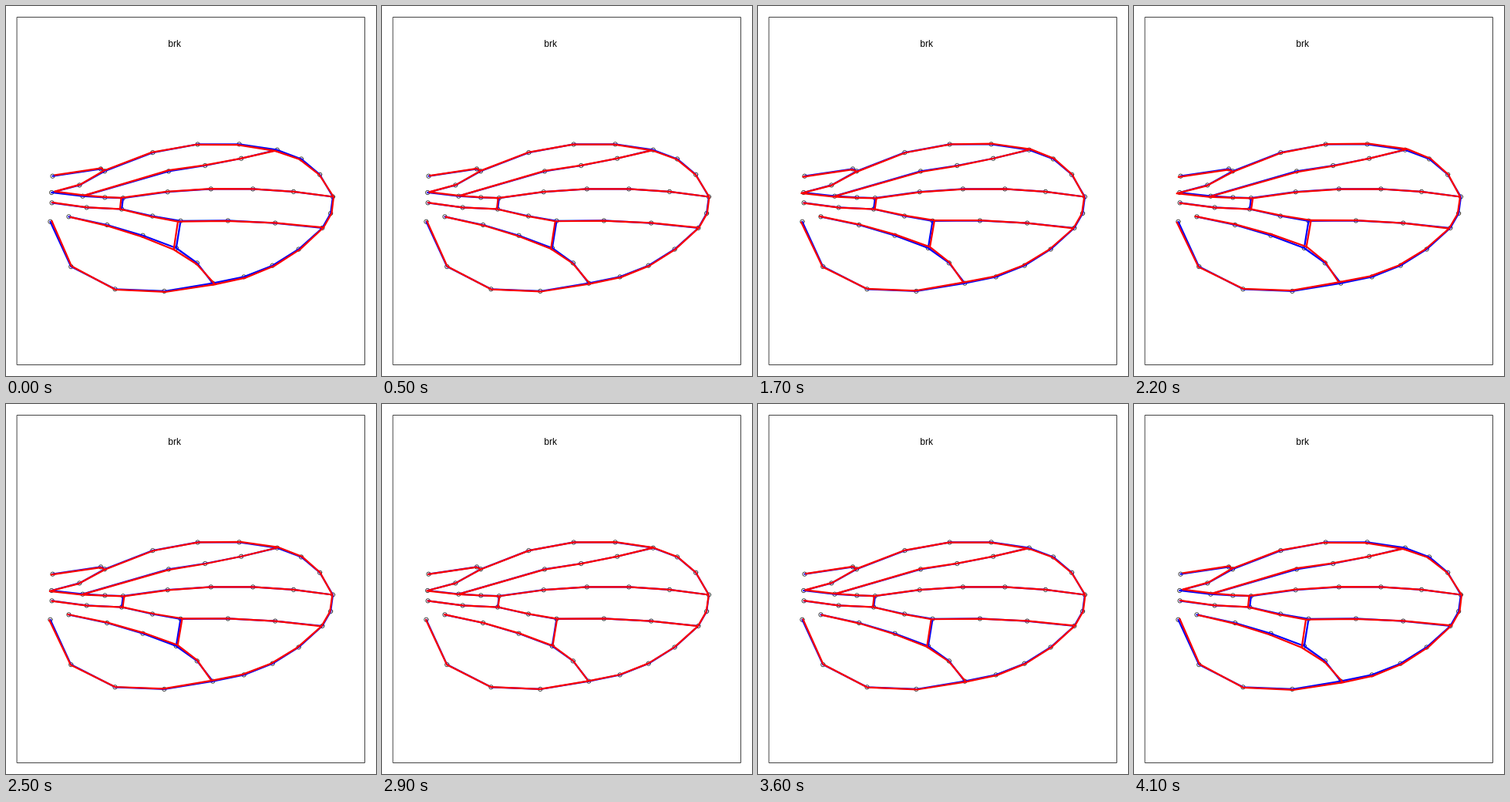
These frames come from a looping animation (480x480 px, 4200 ms). An HTML page with a canvas:

```html
<!DOCTYPE html>
<html>
<head>
<meta charset="utf-8">
<style>
  html, body { margin: 0; width: 100%; height: 100%; overflow: hidden; background: #fff; }
  canvas { display: block; }
</style>
</head>
<body>
<canvas id="stage" width="480" height="480"></canvas>
<script>
const ctx = document.getElementById('stage').getContext('2d');

// Vein joints: mean x and y, then the drift at the start of the sweep.
const joints = {
  spur: [60.5, 220.7, 3, -1.3],
  notch: [123, 211.4, .5, -1.1],
  shoulder: [128, 214.3, -.8, -.8],
  crest: [351.8, 186.7, -3, 1.2],
  tip: [424, 247.5, 1, 0],
  heel: [410.3, 288, 1.7, -.7],
  keel: [268.3, 359.7, 3, 1.5],
  belly: [141.5, 367.3, 0, .5],
  tail: [57.4, 279.8, 1.9, -1],
  root: [59.2, 242, 4, -1.3],
  fork: [99.5, 246.7, 2.5, -1],
  bridgeTop: [151.9, 249.2, -2.4, -.3],
  rise: [211, 214.4, 0, -1.2],
  midRoot: [59.6, 255.3, .3, -.4],
  bridgeEnd: [150.1, 263.5, -2.2, -.1],
  crossTop: [226.5, 278.8, -3.5, .9],
  lowRoot: [81.5, 273.3, 2, .5],
  crossEnd: [220.8, 314, -3.2, 2]
};

// from, to, number of pieces, sideways bend in px, lead of the inner points
const veins = [
  ['spur', 'notch', 1], ['notch', 'shoulder', 1],
  ['shoulder', 'crest', 4, -20, .2],
  ['crest', 'tip', 3, -12.5],
  ['tip', 'heel', 2, -4.2],
  ['heel', 'keel', 4, -14.4],
  ['keel', 'belly', 2, -6.5], ['belly', 'tail', 2, -21],
  ['root', 'shoulder', 2, 4.6],
  ['root', 'fork', 1], ['fork', 'bridgeTop', 2, .3, .2],
  ['bridgeTop', 'tip', 5, -11.4, .08],
  ['fork', 'rise', 1], ['rise', 'crest', 3, 2.1],
  ['midRoot', 'bridgeEnd', 2, 2], ['bridgeEnd', 'crossTop', 2, 1, .1],
  ['crossTop', 'heel', 3, -3.8],
  ['lowRoot', 'crossEnd', 3, -4, .07], ['crossEnd', 'keel', 2, -4.8],
  ['bridgeTop', 'bridgeEnd', 1], ['crossTop', 'crossEnd', 1]
];

function place(name, amount) {
  const [x, y, dx, dy] = joints[name];
  return [x + amount * dx, y + amount * dy];
}

// Points along a parabola over the line between two joints
function trace([from, to, pieces, bend = 0, lead = 0], amount) {
  const [x, y] = place(from, amount), [endX, endY] = place(to, amount);
  const w = endX - x, h = endY - y, length = Math.hypot(w, h);
  return Array.from({ length: pieces + 1 }, (_, i) => {
    const even = i / pieces;
    const u = even + lead * even * (1 - even);
    const sag = bend * 4 * u * (1 - u) / length;
    return [x + w * u - h * sag, y + h * u + w * sag];
  });
}

function drawWing(amount, color) {
  ctx.strokeStyle = color;
  ctx.lineWidth = 2.25;
  ctx.beginPath();
  for (const vein of veins) {
    trace(vein, amount).forEach((p, i) => ctx[i ? 'lineTo' : 'moveTo'](...p));
  }
  ctx.stroke();
}

const marks = [
  ...Object.keys(joints).map(name => place(name, 0)),
  ...veins.flatMap(vein => trace(vein, 0).slice(1, -1))
];

function drawMarks() {
  ctx.strokeStyle = '#000';
  ctx.lineWidth = .75;
  for (const [x, y] of marks) {
    ctx.beginPath();
    ctx.arc(x, y, 2.7, 0, 2 * Math.PI);
    ctx.stroke();
  }
}

function draw(now) {
  // 21 poses forward, then the same 21 backward, 100 ms each
  const step = Math.floor(now / 100) % 42;
  const amount = 1 - Math.min(step, 41 - step) / 10;

  ctx.fillStyle = '#fff';
  ctx.fillRect(0, 0, 480, 480);
  ctx.lineCap = ctx.lineJoin = 'round';
  drawMarks();
  drawWing(0, '#00f');
  drawWing(amount, '#f00');

  ctx.lineWidth = 1;
  ctx.strokeStyle = '#444';
  ctx.strokeRect(14.5, 14.5, 451, 451);
  ctx.fillStyle = '#000';
  ctx.font = '12px "Liberation Sans", Arial, sans-serif';
  ctx.textAlign = 'center';
  ctx.fillText('brk', 218.6, 53);
}

function tick() {
  draw(performance.now());
  requestAnimationFrame(tick);
}
tick();
</script>
</body>
</html>
```
